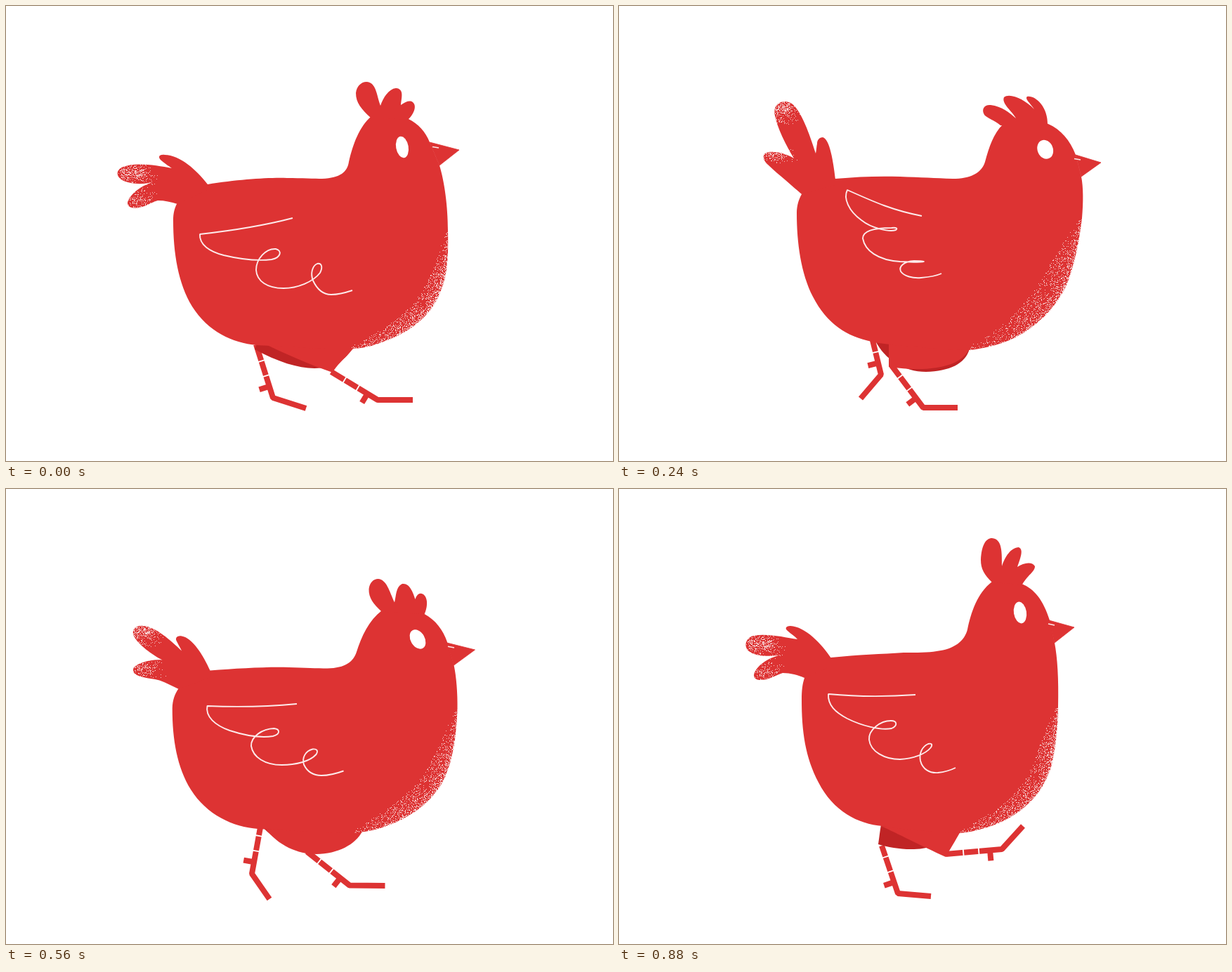
Animation of 864x648 px, one loop 960 ms. Source, as an HTML page with a canvas:

```html
<!DOCTYPE html>
<html lang="en">
<head>
<meta charset="utf-8">
<title>Walking hen</title>
<style>
html, body { margin: 0; width: 100%; height: 100%; overflow: hidden; background: #fff; }
canvas { display: block; width: 864px; height: 648px; }
</style>
</head>
<body>
<canvas id="stage" width="864" height="648"></canvas>
<script>
const ctx = document.getElementById('stage').getContext('2d');
const RED = '#dd3333', DARK = '#c02425', STEP = 80;

// Poses are stepped. A null is the halfway pose between its neighbours.
const body = [
  `M262 262 L287 254 C330 247 375 244 400 245 C420 245 440 246 450 246 C476 245 486 236 488 222
   C494 196 503 172 520 157 C535 150 558 152 573 161 C587 168 597 179 603 194 L617 227
   C624 250 629 285 629 320 C630 360 628 385 618 408 C606 440 576 465 535 479 C520 485 505 488 490 488
   C470 490 380 484 357 483 C322 480 287 463 265 428 C245 395 238 352 238 305 C238 295 240 288 243 282 Z`,
  null,
  `M262 272 L294 263 C330 264 370 262 405 263 C430 264 445 265 465 265 C490 265 503 256 510 242
   C518 224 530 202 550 189 C565 180 600 184 618 195 C636 205 647 222 653 242 L658 274
   C658 285 657 297 656 308 C652 345 645 380 634 407 C621 440 582 470 545 482 C530 487 510 491 500 491
   C470 492 385 486 360 485 C325 483 284 465 261 428 C242 397 235.5 362 235.5 320 C236 305 241 296 247 288 Z`,
  `M275 254 L308 246 C340 243 370 242 400 243 C430 244 450 245 475 246 C500 246 516 238 521 222
   C527 200 533 182 546 169 C565 162 596 162 611 168 C629 176 642 191 650 212 L658 243
   C661 258 661 280 659 302 C655 335 650 360 641 387 C630 420 600 455 560 474 C540 483 515 489 497 490
   C470 490 385 484 360 478 C325 471 296 453 276 414 C259 381 253 337 253 295 C253 284 256 275 260 268 Z`,
  null,
  `M275 250 L302 240 C340 236 375 235 405 233 C425 233 440 233 452 231 C478 228 492 216 496 200
   C501 176 510 148 531 132 C545 126 562 128 573 135 C591 142 604 158 613 187 L620 219
   C624 240 626 270 625 310 C625 335 622 365 617 388 C609 427 577 464 530 480 C515 485 500 489 484 490
   C465 490 395 484 375 480 C340 477 305 459 284 418 C265 382 260 345 260 300 C260 287 261 278 264 269 Z`
];

const crest = [
  `M519 159 C506 147 498 138 498 124 C499 114 506 108 513 108 C527 109 527 125 533 142
   C537 130 545 118 555 117 C567 118 563 130 562 141 C569 136 575 134 579 137 C586 143 579 156 572 162 Z`,
  null,
  `M550 190 C540 181 534 172 535 161 C536 152 541 148 546 148 C557 149 564 166 573 181
   C574 172 565 162 571 154 C580 147 595 162 603 173 C601 164 602 161 607 162 C616 164 622 180 619 195 Z`,
  `M543 170 C535 163 523 159 520 155 C515 146 521 140 529 141 C545 143 556 152 565 160
   C560 150 544 139 548 130 C556 123 578 133 591 147 C586 139 577 132 581 129 C592 127 611 143 610 170 Z`,
  null,
  `M531 133 C520 122 515 114 515 101 C516 80 522 70 531 70 C546 71 545 92 545 110
   C549 97 558 83 569 83 C576 86 572 97 567 111 C576 105 588 103 592 110 C592 118 583 121 574 136 Z`
];

const tail = [
  `M287 254 C272 234 247 212 226 212 C217 211 216 216 221 220 C228 226 232 228 236 231
   C215 227 185 222 167 229 C156 233 157 242 164 247 C175 254 195 255 213 250
   C194 254 176 268 173 280 C173 289 184 288 190 287 C200 285 208 279 216 277 C226 277 235 279 244 282 L287 262 Z`,
  null,
  `M294 263 C290 240 283 211 274 207 C268 206 265 210 265 214 C264 220 264 224 264 230
   C255 205 240 170 225 161 C212 153 199 160 200 172 C202 190 221 217 232 237
   C218 230 199 227 190 230 C185 235 187 242 193 247 C203 255 212 261 221 268 C230 275 239 282 248 288 L294 275 Z`,
  `M308 247 C305 222 300 189 290 187 C285 187 282 191 282 196 C281 201 281 205 280 210
   C271 182 260 150 246 139 C234 132 221 138 221 152 C225 174 238 199 249 217
   C236 209 218 206 209 209 C203 213 206 221 212 226 C220 234 229 241 237 248 C245 255 253 262 260 268 L308 255 Z`,
  null,
  `M302 241 C288 220 265 196 244 195 C237 195 236 199 240 202 C245 207 250 209 254 214
   C235 211 205 204 188 210 C177 217 180 227 185 231 C195 239 215 239 231 236
   C212 240 194 253 192 265 C192 273 202 273 210 271 C218 269 226 264 233 262 C244 262 255 265 264 269 L302 252 Z`
];

const wing = [
  `M408 302 C370 312 330 319 276 325 C275 340 290 350 310 355 C335 361 360 363 378 361
   C392 358 393 348 384 346 C370 345 356 360 356 376 C357 392 372 402 395 402 C415 402 437 393 447 380
   C452 370 448 366 443 367 C436 370 433 381 437 391 C443 404 452 411 463 411 C475 411 484 408 493 405`,
  null,
  `M420 310 C375 308 340 303 297 293 C292 308 305 323 327 333 C348 342 368 346 382 343
   C390 340 387 336 379 336 C360 338 341 345 342 356 C346 372 365 384 390 384 C410 384 428 383 436 376
   C438 374 436 374 430 374 C416 376 409 385 411 394 C415 402 424 405 435 405 C447 405 458 402 468 398`,
  `M431 299 C390 291 365 280 325 262 C319 274 327 292 345 305 C360 317 385 322 394 319
   C397 317 395 315 388 316 C365 316 347 320 347 331 C350 348 368 362 400 364 C420 365 434 365 434 364
   C434 363 425 363 420 363 C405 364 398 371 401 378 C406 385 418 388 430 387 C442 386 450 385 459 381`,
  null,
  `M422 293 C380 296 340 296 298 292 C297 308 308 318 325 327 C345 337 372 344 388 341
   C397 337 396 330 387 330 C372 330 355 343 356 357 C358 374 378 385 400 385 C418 384 436 378 444 368
   C447 363 444 362 440 363 C431 367 427 377 429 387 C432 399 442 405 454 404 C464 403 471 401 479 397`
];

// x, y, rx, ry, tilt in degrees
const eye = ['564 201 8.8 15.5 -10', null, '608 227 11.3 13.8 -50', '606.7 204.3 11 13.8 -22', null, '571 176 9 15.5 -9'];

// Grain clusters on the two long tail feathers: x, y, spread x, spread y
const tips = ['182 239 13 8 186 277 12 8', null, '208 167 10 9 200 233 12 5',
  '232 146 10 9 219 211 12 5', null, '203 222 13 8 206 262 12 8'];
const shade = ['26', null, '36', '38', null, '27'];

const beakHalf = ['M603 194 L645 205 L617 227', null, 'M653 242 L690 263 L658 274',
  'M650 212 L686 223 L658 243', null, 'M612 187 L648 197 L620 219'];
const nostrilHalf = ['M607 200.5 L616 202', null, 'M655 249 L664 253',
  'M648 217.5 L657 219', null, 'M611 192 L620 194'];
const beak = [...beakHalf, ...beakHalf], nostril = [...nostrilHalf, ...nostrilHalf];
beak[8] = 'M652 244 L690 253 L658 275';
nostril[8] = 'M651 248 L660 250';

// hip, ankle, toe
const nearLeg = ['463 521 529 561 579 561', null, '390 517 448 567 500 567', '388 512 433 572 482 572',
  null, '374 508 397 576 444 580', '368 484 362 561 406 580', '362 482 350 548 375 584',
  '356 478 345 526 344 567', '366 472 373 526 344 560', '412 500 455 535 488 565', '465 520 545 513 575 480'];
const farLeg = ['356 482 380 558 427 573', '353 480 359 548 386 582', '350 478 347 526 345 567',
  '360 472 373 525 344 559', '412 500 455 535 488 565', '465 520 545 513 575 480', '469 513 529 561 579 562',
  null, '388 520 449 568 500 568', '383 515 432 571 481 571', null, '374 508 397 576 444 580'];

const nearThigh = [
  'M370 482 C395 494 430 510 465 522 C470 512 480 504 495 487', null,
  'M384 484 C384 495 385 510 386 518 C450 522 490 515 503 489',
  'M384 480 C384 490 384 505 384 514 C440 522 488 515 499 487', null,
  'M373 480 C371 490 370 500 369 506 C410 518 465 522 486 488',
  'M366 485 C390 505 415 517 437 517 C465 516 490 505 503 486', null,
  'M374 484 C385 510 415 523 446 523 C480 523 505 508 512 488',
  'M375 479 C386 505 415 520 446 520 C480 520 502 505 508 487', null,
  'M373 480 C395 490 430 508 465 524 C472 512 478 502 486 488'];
const farThigh = [
  'M357 482 C355 486 354 488 354 489 C420 525 470 525 493 488', null,
  'M364 484 C380 510 405 524 437 524 C470 524 495 512 503 490',
  'M365 477 C378 503 405 521 437 521 C470 520 493 510 499 488', null,
  'M373 480 C395 490 430 508 465 524 C472 512 478 502 486 488',
  'M357 482 C390 505 430 512 470 516 C474 512 478 508 490 488', null,
  'M376 484 C378 496 380 510 383 521 C400 521 430 518 490 488',
  'M377 479 C377 490 378 505 379 515 C400 516 430 514 490 488', null,
  'M373 478 C371 490 370 500 369 506 C400 515 450 521 480 488'];

const nums = s => s.match(/-?[\d.]+/g).map(Number);

function pose(list, step) {
  const n = list.length, i = step % n;
  if (list[i]) return list[i];
  const next = nums(list[(i + 1) % n]);
  let k = 0;
  return list[(i + n - 1) % n].replace(/-?[\d.]+/g, v => (+v + next[k++]) / 2);
}

function seeded(seed) {
  return () => {
    seed = seed + 0x6D2B79F5 | 0;
    let t = Math.imul(seed ^ seed >>> 15, 1 | seed);
    t = t + Math.imul(t ^ t >>> 7, 61 | t) ^ t;
    return ((t ^ t >>> 14) >>> 0) / 4294967296;
  };
}

function fill(d, color) {
  ctx.fillStyle = color;
  ctx.fill(new Path2D(d));
}

function line(d, color, width) {
  ctx.strokeStyle = color;
  ctx.lineWidth = width;
  ctx.stroke(new Path2D(d));
}

function leg(s) {
  const [hx, hy, ax, ay, tx, ty] = nums(s);
  const len = Math.hypot(ax - hx, ay - hy);
  const dx = (ax - hx) / len, dy = (ay - hy) / len;
  // Point given by distance up from the ankle and sideways to the heel
  const at = (up, side) => `${ax - dx * up - dy * side} ${ay - dy * up + dx * side}`;
  line(`M${hx} ${hy} L${ax} ${ay} L${tx} ${ty}`, RED, 8);
  line(`M${at(17, 0)} L${at(17, 15)}`, RED, 8);
  for (const up of [33, 55])
    if (up < len) line(`M${at(up, -5)} L${at(up, 5)}`, '#fff', 1.8);
}

function grain(x, y) {
  ctx.fillRect(Math.round(x), Math.round(y), 1, 1);
}

function clipped(d, draw) {
  ctx.save();
  ctx.clip(new Path2D(d));
  ctx.fillStyle = 'rgba(255,255,255,.7)';
  draw();
  ctx.restore();
}

function breastGrain(d, width) {
  const p = nums(d), rnd = seeded(7);
  const first = 46; // breast curve starts after the neck
  for (let i = 0; i < 1900; i++) {
    const u = rnd();
    const [seg, t] = u < .36 ? [0, u / .36] : u < .84 ? [1, (u - .36) / .48] : [2, (u - .84) / .16];
    const o = first + seg * 6, v = 1 - t;
    const bez = k => v * v * v * p[o + k] + 3 * v * v * t * p[o + 2 + k] + 3 * v * t * t * p[o + 4 + k] + t * t * t * p[o + 6 + k];
    const x = bez(0), y = bez(1);
    const cx = 440 - x, cy = 350 - y, len = Math.hypot(cx, cy);
    const swell = Math.sin(Math.PI * u);
    const depth = width * Math.pow(swell, .6) * Math.pow(rnd(), 2.2);
    if (rnd() < .15 + 1.2 * swell) grain(x + cx / len * depth, y + cy / len * depth);
  }
}

function tailGrain(s) {
  const p = nums(s), rnd = seeded(23);
  const spread = () => (rnd() + rnd() + rnd() - 1.5) * 2;
  for (let i = 0; i < 640; i++) {
    const o = i < 420 ? 0 : 4;
    grain(p[o] + spread() * p[o + 2], p[o + 1] + spread() * p[o + 3]);
  }
}

function draw(step) {
  const torso = pose(body, step), feathers = pose(tail, step);
  ctx.fillStyle = '#fff';
  ctx.fillRect(0, 0, 864, 648);
  ctx.lineJoin = 'bevel';

  leg(pose(farLeg, step));
  fill(pose(farThigh, step), DARK);
  leg(pose(nearLeg, step));
  fill(pose(nearThigh, step), RED);
  for (const d of [torso, feathers, pose(crest, step), pose(beak, step)]) fill(d, RED);
  line(pose(beak, step) + 'Z', RED, .8); // closes the seam with the head

  clipped(torso, () => breastGrain(torso, +pose(shade, step)));
  clipped(feathers, () => tailGrain(pose(tips, step)));

  line(pose(wing, step), '#fdeaea', 1.9);
  line(pose(nostril, step), '#fdeaea', 1.7);
  const [x, y, rx, ry, tilt] = nums(pose(eye, step));
  ctx.fillStyle = '#fff';
  ctx.beginPath();
  ctx.ellipse(x, y, rx, ry, tilt * Math.PI / 180, 0, Math.PI * 2);
  ctx.fill();
}

let shown = -1;
function tick() {
  const step = Math.floor(performance.now() / STEP) % 12;
  if (step !== shown) draw(shown = step);
  requestAnimationFrame(tick);
}
tick();
</script>
</body>
</html>
```
